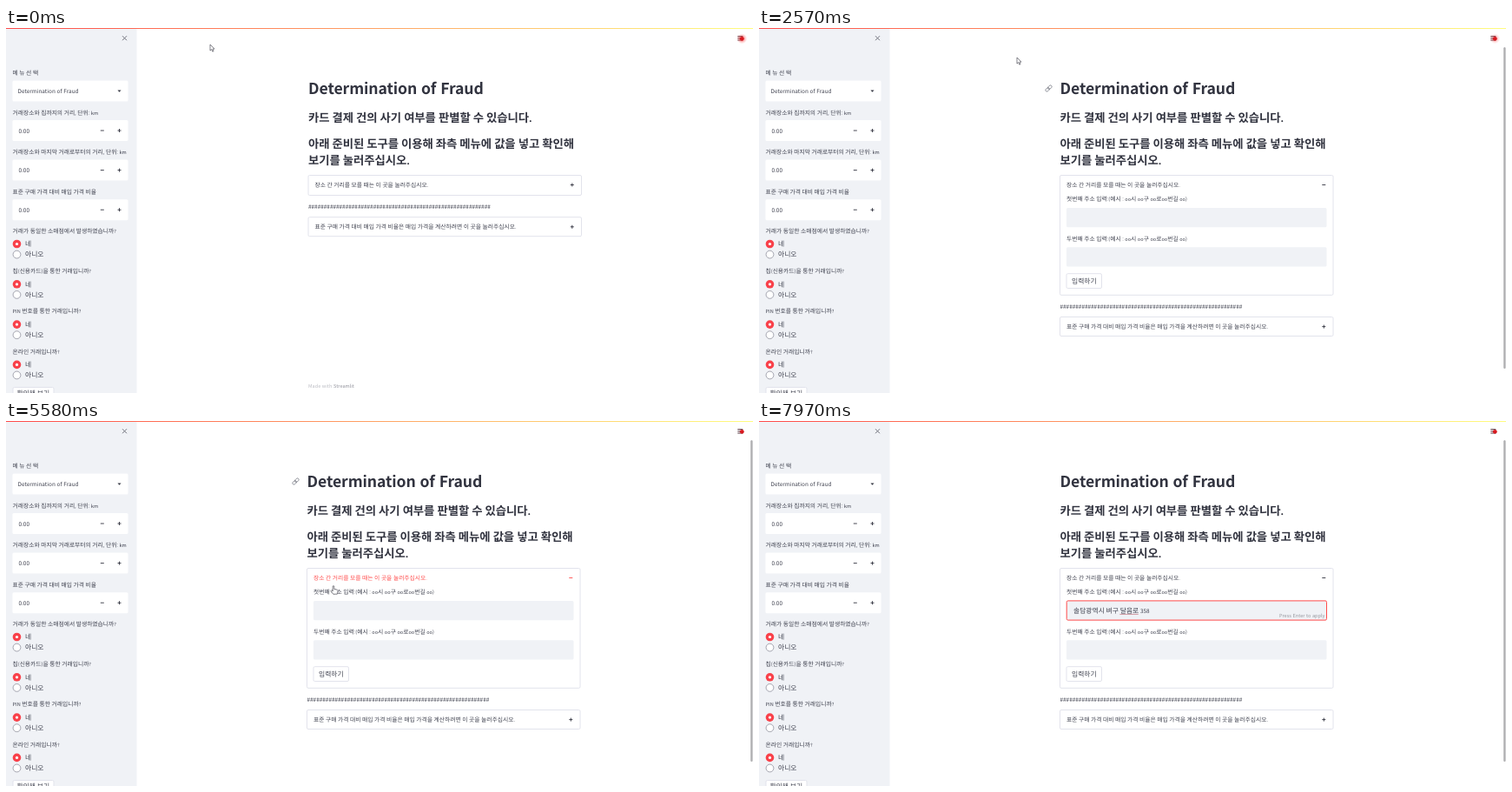
Write an HTML page that moves like this. It is 860 by 420 pixels and loops after 8 s.

```html
<!DOCTYPE html>
<html lang="ko">
<head>
<meta charset="utf-8">
<title>Determination of Fraud</title>
<style>
  html, body { margin: 0; width: 100%; height: 100%; overflow: hidden; background: #fff; }
  svg { display: block; width: 100vw; height: 100vh; }
  text {
    font-family: "Noto Sans CJK KR", "Noto Sans KR", "Noto Sans CJK JP", "Noto Sans CJK", sans-serif;
    text-rendering: geometricPrecision;
    white-space: pre;
  }
</style>
</head>
<body>
<svg id="stage" viewBox="0 0 860 420">
  <defs>
    <linearGradient id="bar">
      <stop offset="0" stop-color="#ff4b4b"/><stop offset="1" stop-color="#fffd80"/>
    </linearGradient>
    <radialGradient id="glow">
      <stop offset="0" stop-color="#ff2020"/><stop offset=".5" stop-color="#ff3030" stop-opacity=".8"/>
      <stop offset="1" stop-color="#ff6060" stop-opacity="0"/>
    </radialGradient>
    <clipPath id="fold"><rect id="foldBox" x="340" y="192" width="330" height="0"/></clipPath>
  </defs>
</svg>
<script>
const LOOP = 8000;
const INK = '#31333f', SOFT = '#3e404e', PANEL = '#f0f2f6', EDGE = '#e2e3ec', RED = '#ff4b4b', PAPER = '#fff';
const SMALL = 6.24, BODY = 7.17;
const OPEN_AT = 1510, OPEN_MS = 500, OPEN_H = 114.8;
const AWAY_AT = 3200, BACK_AT = 5250;
const FOCUS_AT = 6050, TYPE_AT = 6200, TYPED_AT = 7050;
const ADDRESS = '솔담광역시 벼구 달음로 358';
const stage = document.getElementById('stage');

function add(parent, tag, attrs = {}) {
  const el = document.createElementNS('http://www.w3.org/2000/svg', tag);
  for (const k in attrs) el.setAttribute(k, attrs[k]);
  parent.append(el);
  return el;
}
const group = (parent, attrs) => add(parent, 'g', attrs);
const box = (parent, x, y, width, height, attrs) =>
  add(parent, 'rect', { x, y, width, height, rx: 1.5, fill: PAPER, ...attrs });
const path = (parent, d, attrs) => add(parent, 'path', { d, fill: 'none', ...attrs });

// Hangul and Latin runs get their own size so both match one nominal size.
function fill(el, str, size) {
  el.textContent = '';
  for (const run of str.match(/[가-힣]+|[^가-힣]+/g) || []) {
    const hangul = /[가-힣]/.test(run);
    add(el, 'tspan', { 'font-size': size / (hangul ? 0.92 : 1.117) }).textContent = run;
  }
}
function text(parent, x, y, str, size = SMALL, attrs = {}) {
  const el = add(parent, 'text', { x, y, fill: SOFT, ...attrs });
  fill(el, str, size);
  return el;
}
function sign(parent, x, y, plus, stroke = INK) {
  const d = `M${x - 2} ${y}h4` + (plus ? `M${x} ${y - 2}v4` : '');
  return path(parent, d, { stroke, 'stroke-width': 0.9 });
}
const show = (el, on) => el.setAttribute('display', on ? 'inline' : 'none');
const move = (el, x, y) => el.setAttribute('transform', `translate(${x} ${y})`);

function buildSidebar() {
  const g = group(stage);
  add(g, 'rect', { width: 150.5, height: 420, fill: PANEL });
  path(g, 'M134 9.2l5 5m0-5l-5 5', { stroke: '#73757f', 'stroke-width': 1 });

  text(g, 7.5, 54, '메 뉴 선 택');
  box(g, 7.5, 60.5, 133, 24);
  text(g, 13.5, 75, 'Determination of Fraud', BODY);
  path(g, 'M128.5 71.5h4l-2 2.2z', { fill: INK });

  ['거래장소와 집까지의 거리, 단위: km', '거래장소와 마지막 거래로부터의 거리, 단위: km', '표준 구매 가격 대비 매입 가격 비율']
    .forEach((s, i) => {
      const y = 97 + i * 45.6;
      text(g, 7.5, y + 2.5, s);
      box(g, 7.5, y + 9, 133, 24);
      text(g, 14.5, y + 23.6, '0.00', BODY);
      sign(g, 110.8, y + 21, false);
      sign(g, 130.5, y + 21, true);
    });

  ['거래가 동일한 소매점에서 발생하였습니까?', '칩(신용카드)을 통한 거래입니까?', 'PIN 번호를 통한 거래입니까?', '온라인 거래입니까?']
    .forEach((s, i) => {
      const y = 233.2 + i * 46.3;
      text(g, 7.5, y + 2.5, s);
      add(g, 'circle', { cx: 12.5, cy: y + 15.3, r: 4.8, fill: '#f9414a' });
      add(g, 'circle', { cx: 12.5, cy: y + 15.3, r: 1.6, fill: '#fff' });
      add(g, 'circle', { cx: 12.5, cy: y + 27.4, r: 4.4, fill: PAPER, stroke: '#8e909c', 'stroke-width': 0.8 });
      text(g, 22, y + 18.1, '네', BODY);
      text(g, 22, y + 30.2, '아니오', BODY);
    });
  box(g, 8, 413.5, 47, 18, { stroke: EDGE });
  text(g, 12.5, 422.8, '확인해 보기', BODY);
}

function buildMain() {
  const main = group(stage), ui = { main };
  const head = (y, s, size) =>
    text(main, 348, y, s, size, { fill: INK, 'font-weight': 700, 'letter-spacing': -0.005 * size });
  head(76, 'Determination of Fraud', 19.7);
  head(108.3, '카드 결제 건의 사기 여부를 판별할 수 있습니다.', 12.32);
  head(138, '아래 준비된 도구를 이용해 좌측 메뉴에 값을 넣고 확인해', 12.32);
  head(157, '보기를 눌러주십시오.', 12.32);

  ui.link = group(main, { transform: 'translate(335 69.5) rotate(-45)' });
  for (const x of [-4.4, -0.6])
    box(ui.link, x, -1.6, 5, 3.2, { rx: 1.6, fill: 'none', stroke: '#777984', 'stroke-width': 0.8 });

  ui.card = box(main, 348, 169.5, 314.5, 23, { stroke: EDGE });
  ui.title = text(main, 355.5, 183, '장소 간 거리를 모를 때는 이 곳을 눌러주십시오.');
  ui.plus = sign(main, 651.8, 180.5, true);
  ui.minus = sign(main, 651.8, 180.5, false);

  const form = group(main, { 'clip-path': 'url(#fold)' });
  ['첫번째', '두번째'].forEach((s, i) => {
    const y = i * 45.3;
    text(form, 355.5, 199.3 + y, s + ' 주소 입력:(예시 : oo시 oo구 oo로oo번길 oo)');
    box(form, 355.5, 207 + y, 299.5, 22.3, { fill: PANEL });
  });
  box(form, 355.5, 282.7, 40.5, 16.8, { stroke: EDGE });
  text(form, 361.5, 293.8, '입력하기', BODY);

  ui.focus = group(form);
  box(ui.focus, 355.7, 206.9, 299.3, 22.2, { fill: 'none', stroke: RED, 'stroke-width': 1 });
  ui.entry = text(ui.focus, 363.5, 220.6, '', BODY);
  ui.squiggle = path(ui.focus, 'M416.8 222.4h21.5', { stroke: '#c0707a', 'stroke-width': 0.7 });
  ui.caret = path(ui.focus, 'M0 213.5v8.5', { stroke: INK, 'stroke-width': 0.7 });
  ui.hint = text(ui.focus, 653, 226.4, 'Press Enter to apply', SMALL, { fill: '#96979f', 'text-anchor': 'end' });

  ui.below = group(main);
  text(ui.below, 348, 207.8, '#'.repeat(59), BODY);
  box(ui.below, 348, 217.7, 314.5, 22, { stroke: EDGE });
  text(ui.below, 355.5, 231.3, '표준 구매 가격 대비 매입 가격 비율은 매입 가격을 계산하려면 이 곳을 눌러주십시오.');
  sign(ui.below, 651.8, 228.8, true);

  ui.footer = group(main);
  text(ui.footer, 348, 413.5, 'Made with ', SMALL, { fill: '#bcbdc4' });
  text(ui.footer, 377, 413.5, 'Streamlit', SMALL, { fill: '#94959e' });
  return ui;
}

function buildChrome() {
  add(stage, 'rect', { width: 860, height: 1, fill: 'url(#bar)' });
  const thumb = box(stage, 857.2, 22, 2.4, 377, { fill: '#b0b0b2' });
  path(stage, 'M842.3 9.6h6M842.3 11.8h6M842.3 14h6', { stroke: '#5a3a44', 'stroke-width': 1 });
  const glow = add(stage, 'circle', { cx: 847.3, cy: 12.3, r: 6, fill: 'url(#glow)' });
  add(stage, 'circle', { cx: 847.3, cy: 12.3, r: 2.4, fill: '#d81a20' });
  return { thumb, glow };
}

function buildPointers() {
  const pen = { fill: '#fff', stroke: '#50505a', 'stroke-width': 0.7, 'stroke-linejoin': 'round' };
  return {
    arrow: path(stage, 'M0 0v7l1.6-1.4 1.2 2.6 1.2-.6-1.2-2.5h2.2z', pen),
    hand: path(stage, 'M-.8 0q.8-.9 1.6 0v3.4l3.6.8q.8.3.7 1.2l-.8 3.8h-4.6l-2.8-3.6q.6-1.2 1.6-.4l.7.7z', pen),
    beam: path(stage, 'M-1.4-3.8h2.8M0-3.8v7.6M-1.4 3.8h2.8', { stroke: INK, 'stroke-width': 0.7 })
  };
}

buildSidebar();
const ui = buildMain();
const { thumb, glow } = buildChrome();
const pointers = buildPointers();
const foldBox = document.getElementById('foldBox');

// time, x, y
const TRACK = [
  [0, 235, 19], [250, 235, 19], [1250, 368, 177], [1950, 368, 177], [2570, 297, 34],
  [AWAY_AT, 272, 2], [4220, 268, 0], [4850, 270, 1], [5350, 345, 75], [5580, 377, 190],
  [5950, 396, 217], [LOOP, 396, 217]
];
function pointerAt(t) {
  const i = TRACK.findIndex((p, n) => n && t <= p[0]);
  const [t0, x0, y0] = TRACK[i - 1], [t1, x1, y1] = TRACK[i];
  let k = (t - t0) / (t1 - t0);
  k = k * k * (3 - 2 * k);
  return [x0 + (x1 - x0) * k, y0 + (y1 - y0) * k];
}
const clamp = v => Math.min(1, Math.max(0, v));
const within = (v, a, b) => v >= a && v < b;

let lastEntry = -1;
function drawEntry(t) {
  show(ui.focus, t >= FOCUS_AT);
  if (t < FOCUS_AT) return;
  const n = Math.round(ADDRESS.length * clamp((t - TYPE_AT) / (TYPED_AT - TYPE_AT)));
  if (n !== lastEntry) {
    fill(ui.entry, ADDRESS.slice(0, n), BODY);
    move(ui.caret, 363.9 + (n ? ui.entry.getComputedTextLength() : 0), 0);
    lastEntry = n;
  }
  show(ui.hint, n > 0);
  show(ui.squiggle, n >= 13);
  show(ui.caret, t < TYPED_AT || (t - TYPED_AT) % 1060 < 530);
}

function draw(t) {
  const opened = t >= OPEN_AT;
  const drop = OPEN_H * (1 - (1 - clamp((t - OPEN_AT) / OPEN_MS)) ** 2.5);
  move(ui.main, opened ? -1.5 : 0, 0);
  ui.card.setAttribute('height', 23 + drop);
  foldBox.setAttribute('height', drop);
  move(ui.below, 0, drop);
  show(ui.footer, !opened);
  show(ui.plus, !opened);
  show(ui.minus, opened);
  show(thumb, opened && !within(t, AWAY_AT, BACK_AT));
  thumb.setAttribute('height', 377 - 7 * clamp((t - OPEN_AT - 330) / 170));
  show(ui.link, within(t, 2330, 2680) || within(t, 5320, 5680));

  const [x, y] = pointerAt(t);
  const hover = x > 346 && x < 662 && within(y, 169, 192.5);
  ui.title.setAttribute('fill', hover ? RED : SOFT);
  ui.plus.setAttribute('stroke', hover ? RED : INK);
  ui.minus.setAttribute('stroke', hover ? RED : INK);
  const kind = hover ? 'hand' : opened && within(y, 207, 229) ? 'beam' : 'arrow';
  for (const k in pointers) {
    show(pointers[k], k === kind && t < TYPE_AT);
    move(pointers[k], x, y);
  }

  drawEntry(t);
  const pulse = Math.cos((t - 1940) / 2500 * 2 * Math.PI);
  glow.setAttribute('opacity', clamp(0.3 + pulse));
}

const start = performance.now();
function tick() {
  draw((performance.now() - start) % LOOP);
  requestAnimationFrame(tick);
}
tick();
</script>
</body>
</html>
```
